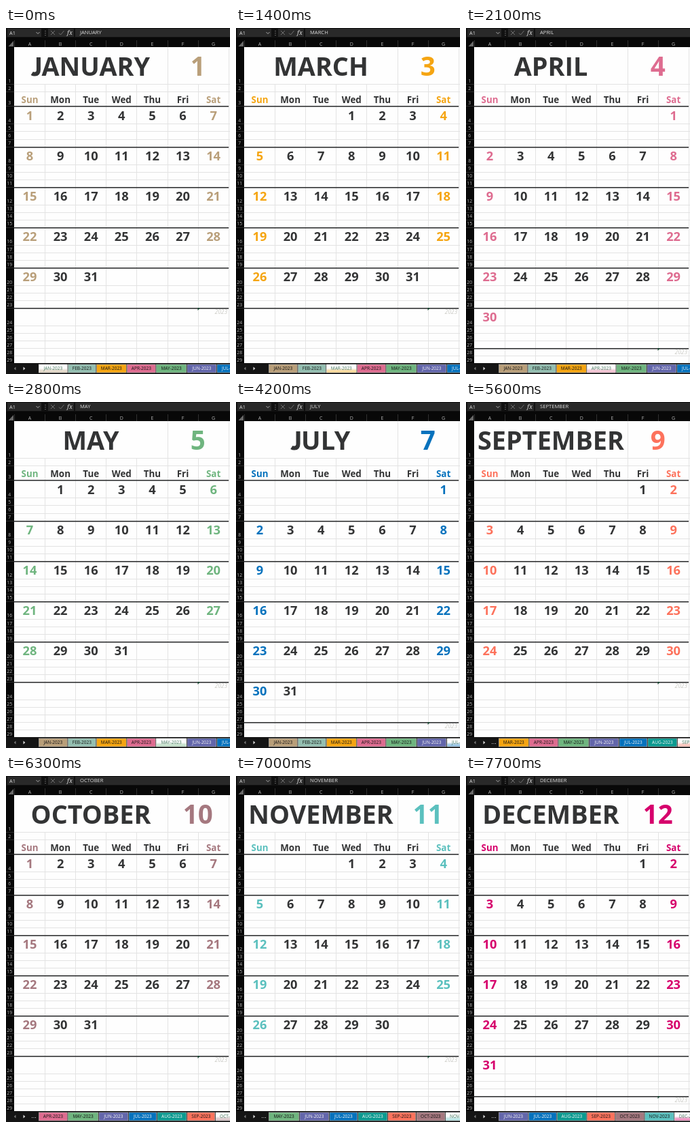
Animation of 330 by 507 pixels, one loop 8.4 s. Source, as an HTML page with a canvas:

```html
<!DOCTYPE html>
<html lang="en">
<head>
<meta charset="utf-8">
<title>Calendar 2023</title>
<style>
html, body { margin: 0; width: 330px; height: 507px; overflow: hidden; background: #111; }
canvas { display: block; }
</style>
</head>
<body>
<canvas id="stage" width="330" height="507"></canvas>
<script>
const c = document.getElementById('stage').getContext('2d');
const STEP = 700, YEAR = 2023, INK = '#333435';
const FACE = '"Open Sans", "Noto Sans", sans-serif';
const MONTHS = 'JANUARY FEBRUARY MARCH APRIL MAY JUNE JULY AUGUST SEPTEMBER OCTOBER NOVEMBER DECEMBER'.split(' ');
const COLORS = ['#b99f7a', '#94bfb1', '#f5a512', '#de6c90', '#6fb57f', '#6366ab',
  '#0672bd', '#0c9a90', '#fd725c', '#a5787f', '#5bc0be', '#d6006c'];
const TAB_STEP = [43, 42, 45, 43, 45.5, 44, 42, 44, 42, 43, 44, 43];
const DAYS = ['Sun', 'Mon', 'Tue', 'Wed', 'Thu', 'Fri', 'Sat'];

const colX = i => 12 + i * 45.1;
const midX = i => colX(i) + 23;

// Row edges: title, spacer, weekdays, then six blocks of one tall and three short rows
const rows = [28, 83, 94, 115];
while (rows.length < 30) {
  const tall = rows.length % 4 === 0 && rows.length < 28;
  rows.push(rows.at(-1) + (tall ? 26 : 11.05));
}
const lineY = r => Math.round(rows[r] - 0.6);

function rect(x, y, w, h, fill) {
  c.fillStyle = fill;
  c.fillRect(x, y, w, h);
}

function text(s, x, y, size, fill, style = '', align = 'center') {
  c.font = `${style} ${size}px ${FACE}`;
  c.textAlign = align;
  c.fillStyle = fill;
  c.fillText(s, x, y);
}

function path(points, color, width, close) {
  c.beginPath();
  points.forEach(([x, y]) => c.lineTo(x, y));
  if (close) {
    c.fillStyle = color;
    c.fill();
  } else {
    c.strokeStyle = color;
    c.lineWidth = width;
    c.stroke();
  }
}

function formulaBar(name) {
  rect(2, 1, 50, 12, '#292929');
  rect(62, 1, 38, 12, '#292929');
  rect(102, 1, 228, 12, '#292929');
  text('A1', 5, 9.5, 7.4, '#ddd', '', 'left');
  path([[44.5, 6], [47, 8.5], [49.5, 6]], '#bbb', 0.9);
  for (const y of [4, 7, 10]) rect(57.5, y, 1, 1, '#aaa');
  path([[66, 4], [72, 10]], '#777', 0.9);
  path([[72, 4], [66, 10]], '#777', 0.9);
  path([[78, 7.5], [80.5, 10], [85.5, 4]], '#777', 0.9);
  c.font = 'italic 9px "Noto Serif", serif';
  c.textAlign = 'center';
  c.fillStyle = '#ddd';
  c.fillText('fx', 94, 9.7);
  text(name, 109, 9.2, 7.6, '#ddd', '', 'left');
}

function headers() {
  rect(0, 14, 330, 14, '#080808');
  rect(0, 28, 12, 463, '#080808');
  path([[11, 19], [11, 27], [3.5, 27]], '#686868', 0, true);
  for (let i = 0; i < 7; i++) {
    text('ABCDEFG'[i], midX(i), 25.5, 7, '#b5b5b5');
    rect(Math.round(colX(i)), 18, 1, 10, '#303030');
  }
  for (let r = 1; r < rows.length; r++) {
    text(r, 5.2, rows[r] - 3, 6.8, '#b5b5b5');
    rect(0, lineY(r), 12, 1, '#2b2b2b');
  }
}

function grid(weeks) {
  rect(12, 28, 318, 463, '#fefefe');
  for (let i = 1; i < 8; i++) {
    const top = i === 5 || i === 7 ? 28 : 83;
    rect(Math.round(colX(i)), top, 1, 491 - top, '#e3e3e3');
  }
  for (let r = 1; r < rows.length; r++) rect(12, lineY(r), 318, 1, '#e3e3e3');
  for (let w = 0; w <= weeks; w++) rect(12, lineY(3 + 4 * w), 316, 1.6, INK);
}

function title(name, month, color) {
  const size = 37.8, base = 70, hook = name[0] === 'J' ? 14.5 : 0;
  const rest = hook ? name.slice(1) : name;
  c.font = `bold ${size}px ${FACE}`;
  const x = 125 - (hook + c.measureText(rest).width) / 2;
  text(rest, x + hook, base, size, INK, 'bold', 'left');
  if (hook) {
    // J that stands on the baseline
    c.beginPath();
    c.moveTo(x + 10, base - 27);
    c.lineTo(x + 10, base - 9);
    c.quadraticCurveTo(x + 10, base - 2.5, x + 4.5, base - 2.5);
    c.quadraticCurveTo(x + 2, base - 2.5, x + 0.3, base - 3.6);
    c.strokeStyle = INK;
    c.lineWidth = 6;
    c.stroke();
  }
  text(month + 1, 282.8, base, 38.5, color, 'bold');
}

function dates(month, first, count, color) {
  const tone = d => d % 6 ? INK : color;
  DAYS.forEach((d, i) => text(d, midX(i), 110, 13.4, tone(i), 'bold'));
  for (let n = 1; n <= count; n++) {
    const cell = first + n - 1, day = cell % 7;
    text(n, midX(day), 134.7 + 59.05 * Math.floor(cell / 7), 18.3, tone(day), 'bold');
  }
}

function tabs(month) {
  rect(0, 491, 330, 16, '#151515');
  path([[14.5, 496.5], [14.5, 501.5], [11.8, 499]], '#777', 0, true);
  path([[25.5, 496.5], [25.5, 501.5], [28.3, 499]], '#ddd', 0, true);
  const start = Math.max(0, month - 6);
  if (start) for (const x of [38, 40.5, 43]) rect(x, 500, 1, 1, '#ccc');
  let x = 48.5;
  for (let i = start; i < 12 && x < 330; i++) {
    const w = TAB_STEP[i] - 1.3, on = i === month;
    let fill = COLORS[i];
    if (on) {
      fill = c.createLinearGradient(0, 494, 0, 506);
      fill.addColorStop(0, '#fff');
      fill.addColorStop(0.4, '#fbfbfb');
      fill.addColorStop(1, COLORS[i] + '80');
      rect(x, 493, w, 12, '#fff');
    }
    rect(x, 493, w, 12, fill);
    c.strokeStyle = on ? '#eee' : '#b8b8b8';
    c.lineWidth = 0.6;
    c.strokeRect(x, 493, w, 12);
    const ink = on ? '#4a7d63' : i > 4 && i < 8 ? '#f4f4f4' : '#151515';
    text(`${MONTHS[i].slice(0, 3)}-${YEAR}`, x + w / 2, 501.3, 6.5, ink);
    x += TAB_STEP[i];
  }
}

function draw(month) {
  const first = new Date(YEAR, month, 1).getDay();
  const count = new Date(YEAR, month + 1, 0).getDate();
  const weeks = Math.ceil((first + count) / 7), end = lineY(3 + 4 * weeks);
  const color = COLORS[month];
  rect(0, 0, 330, 507, '#111');
  formulaBar(MONTHS[month]);
  grid(weeks);
  headers();
  title(MONTHS[month], month, color);
  dates(month, first, count, color);
  path([[282.5, end], [286, end], [282.5, end + 4]], '#12422c', 0, true);
  text(YEAR, 326, end + 9, 8.4, '#cbcbc6', 'italic', 'right');
  tabs(month);
}

let shown = -1;
const t0 = performance.now();
function tick() {
  const month = Math.floor((performance.now() - t0) / STEP) % 12;
  if (month !== shown) draw(shown = month);
  requestAnimationFrame(tick);
}
tick();
</script>
</body>
</html>
```
